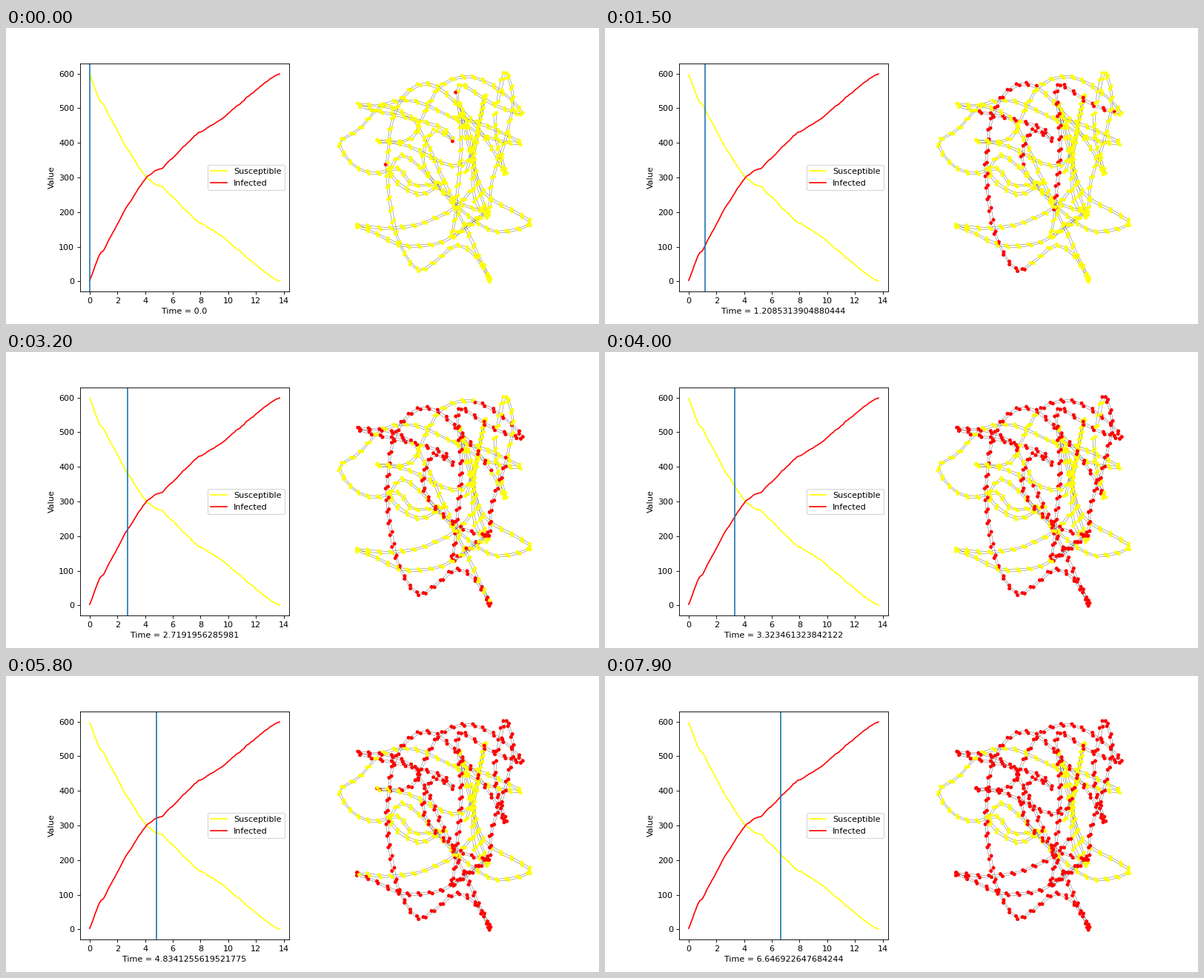
Animation, 800 px wide and 400 px high, one loop 8 s. Source, as a matplotlib script:

```python
import numpy as np
import matplotlib.pyplot as plt
from matplotlib.animation import FuncAnimation
from matplotlib.collections import LineCollection

FRAMES, INTERVAL = 80, 100
STEP = 0.10071094920733703
SAMPLES = 137
GAP = 16       # distance between node pairs
TURN = 6       # extra length per radian, so bends hold more nodes
NEVER = 99
YELLOW, RED = (1, 1, 0, 1), (1, 0, 0, 1)

rng = np.random.default_rng(4)
dots, times, edges = [], [], []


def spline(pts, n):
    """Catmull-Rom curve through pts, n samples per span."""
    p = np.vstack([2 * pts[0] - pts[1], pts, 2 * pts[-1] - pts[-2]])
    u = np.linspace(0, 1, n, endpoint=False)[:, None]
    spans = [b + u / 2 * (c - a + u * (2 * a - 5 * b + 4 * c - d
                                       + u * (3 * (b - c) + d - a)))
             for a, b, c, d in zip(p, p[1:], p[2:], p[3:])]
    return np.vstack(spans + [pts[-1:]])


def strand(*pts, skip=0, n=16):
    """Ladder of node pairs; a point's third value is its infection time."""
    curve = spline(np.array([p[:2] for p in pts], float), n)
    delta = np.diff(curve, axis=0)
    angle = np.unwrap(np.arctan2(delta[:, 1], delta[:, 0]))
    bend = np.abs(np.diff(angle, prepend=angle[0]))
    arc = np.r_[0, np.cumsum(np.hypot(*delta.T) + TURN * bend)]
    s = np.arange(0, arc[-1], GAP)
    mid = np.column_stack([np.interp(s, arc, c) for c in curve.T])
    head = np.interp(s, arc[:-1], angle)
    tangent = np.column_stack([np.cos(head), np.sin(head)])
    off = 1.4 * tangent[:, ::-1] * (-1, 1) + 1.5 * tangent
    sides = [mid + k * off + rng.normal(0, 0.3, mid.shape) for k in (-1, 1)]

    stops = [(arc[i * n], p[2]) for i, p in enumerate(pts) if len(p) > 2]
    when = np.interp(s, *zip(*stops)) if stops else np.full(len(s), NEVER)
    edges.extend(sides)
    for a, b, t in list(zip(*sides, when))[skip:]:
        dots.extend([a, b])
        times.extend([t, t + 0.06])


# Stretches the infection does not reach in this loop
strand((606, 122), (643, 130), (694, 155), (650, 148), (605, 123), (552, 99),
       (508, 105), (476, 137), (450, 156), (472, 188), (500, 196), (530, 190),
       (549, 212), (592, 209))
strand((592, 209), (556, 225), (519, 198), (533, 172), (558, 188), (602, 235),
       (650, 272), (684, 273), (706, 261), (650, 227), (632, 190), (612, 104))
strand((612, 104), (626, 145), (636, 210), (650, 255), (632, 230), (632, 170),
       (646, 91), (634, 150), (618, 205))

# Two fronts run out from each of the three first cases
strand((514, 183, 0), (519, 135), (534, 96), (560, 76), (589, 85, 1.25),
       (632, 130, 2.1), (657, 165), (674, 197, 3.5), (661, 150), (660, 105, 4.5))
strand((514, 183, 0), (517, 229), (530, 289), (554, 326), (575, 319, 1.2),
       (607, 294), (634, 308, 2.3), (653, 341, 2.7), (627, 285), (592, 210),
       (575, 170, 3.3), (556, 133, 4), skip=1)
strand((609, 86, 0), (617, 77), (657, 103), (696, 116, 1.3), (671, 88, 2.1),
       (629, 66), (586, 79, 3.3), (556, 133, 4))
strand((609, 86, 0), (614, 158), (606, 254, 1.2), (603, 281), (621, 267, 2.1),
       (650, 248), (622, 270), (582, 291, 3.6), (536, 294), (498, 277),
       (474, 267, 4.8), (516, 271), (560, 264), (605, 243, 6), (637, 208, 6.8),
       skip=1)
strand((603, 151, 0), (588, 135), (549, 123), (497, 111, 1.2), (477, 104),
       (523, 109, 2.1), (556, 131), (541, 152), (502, 153, 4.8), (541, 159),
       (596, 185, 5.85), (623, 180), (633, 148, 6.6))
strand((603, 151, 0), (577, 139), (563, 172), (571, 200, 1.4), (606, 233),
       (649, 246, 1.9), (655, 208, 2.3), (674, 150), (684, 95), (673, 61, 3.2),
       (662, 105, 4.4), skip=1)
dots, times = np.array(dots), np.array(times)

# Infected count: a bent trend with small random stalls
clock = np.arange(SAMPLES) * STEP
trend = np.interp(clock, [0, 0.8, 1, 2.5, 4.1, 5.4, 7.6, 9.5, 11.8, 13, 13.7],
                  [3, 84, 90, 204, 301, 333, 420, 469, 545, 585, 599])
wobble = np.convolve(rng.normal(0, 3, SAMPLES), np.ones(5) / 5, "same")
infected = np.maximum.accumulate(np.clip(np.round(trend + wobble), 3, 599))
infected[0], infected[-1] = 3, 599

fig = plt.figure(figsize=(10, 5), dpi=80)
ax = fig.add_subplot(1, 2, 1)
ax.plot(clock, 600 - infected, color="yellow", label="Susceptible")
ax.plot(clock, infected, color="red", label="Infected")
ax.set_ylabel("Value")
ax.legend(loc="center right")
cursor = ax.axvline(0)
label = ax.set_xlabel("Time = 0.0")

net = fig.add_axes([0, 0, 1, 1])
net.set(xlim=(0, 800), ylim=(400, 0))
net.axis("off")
net.add_collection(LineCollection(edges, colors="black", linewidths=0.25, zorder=1))
nodes = net.scatter(*dots.T, s=12, linewidths=1, c="yellow", zorder=2)


def update(i):
    now = (5 * i + 2) // 6 * STEP
    cursor.set_xdata([now, now])
    label.set_text(f"Time = {now}")
    nodes.set_color(np.where((times <= now)[:, None], RED, YELLOW))
    return cursor, label, nodes


anim = FuncAnimation(fig, update, frames=FRAMES, interval=INTERVAL,
                     repeat=True, repeat_delay=0)
plt.show()
```
